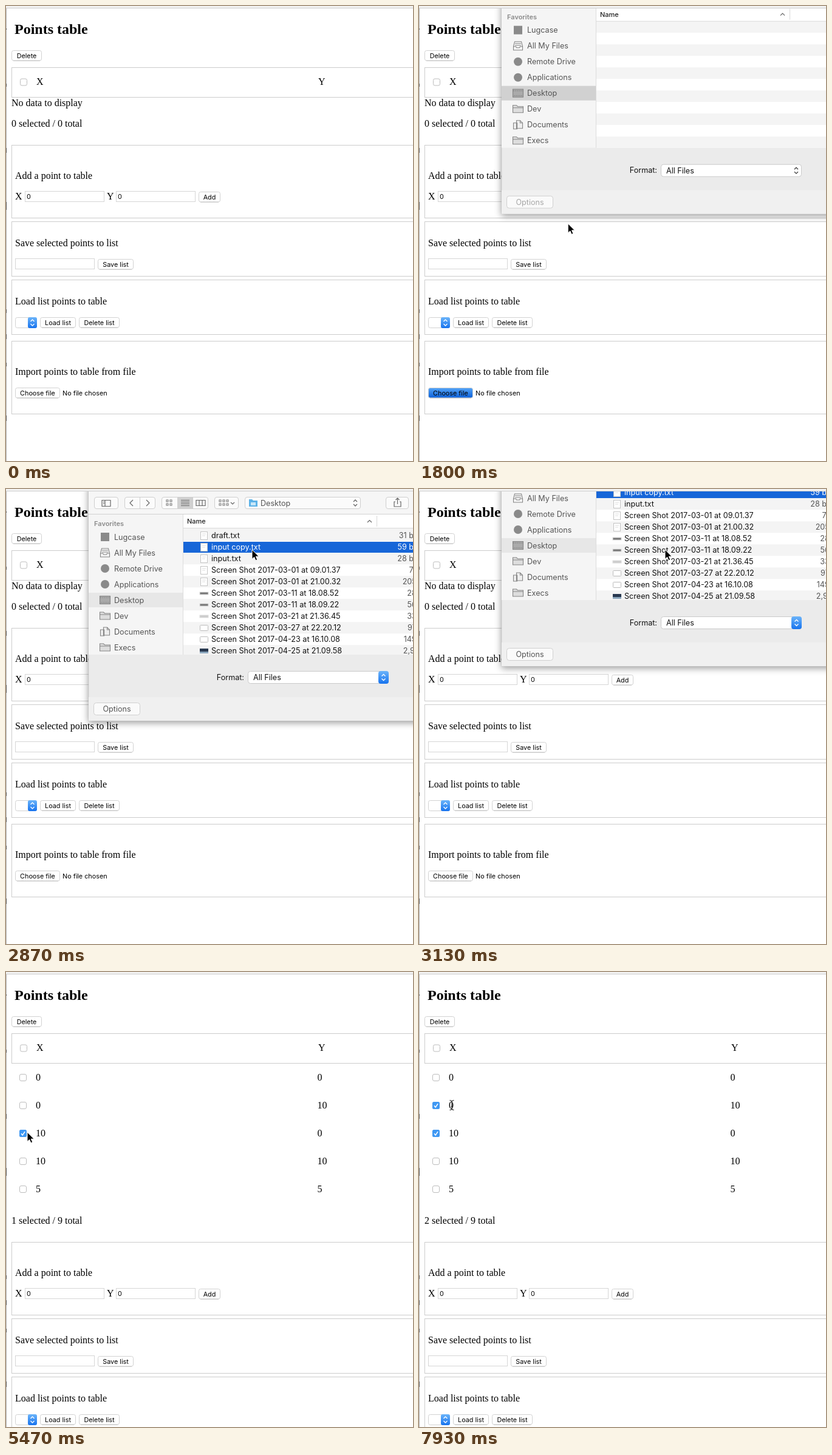
An HTML page for the animation above (8000 ms loop, 670 by 750 pixels).

```html
<!DOCTYPE html>
<html lang="en">
<head>
<meta charset="utf-8">
<title>Points table</title>
<style>
  html, body { margin: 0; width: 100%; height: 100%; overflow: hidden; background: #fff; }
  svg { display: block; }
  text { font: 16px "Liberation Serif", serif; white-space: pre; }
  .title { font-size: 24px; font-weight: bold; }
  .ui { font: 10.8px Inter, sans-serif; }
  .mac { font: 12.6px Inter, sans-serif; fill: #555; }
  .small { font: 600 11px Inter, sans-serif; fill: #8a8a8a; }
  .name { font: 500 11px Inter, sans-serif; fill: #222; }
  .dark { fill: #111; }
  .mid { text-anchor: middle; }
  .end { text-anchor: end; }
  .line { fill: none; stroke: #ccc; }
  .field { fill: #fff; stroke: #d6d6d6; }
  .btn { fill: #fff; stroke: #d2d2d2; }
  .box { fill: #fff; stroke: #bdbdbd; }
  .icon { fill: none; stroke: #858585; stroke-width: 1.1; }
  .solid { fill: #8a8a8a; }
  .glyph { fill: none; stroke: #666; stroke-width: 1.2; }
  .tool { opacity: .5; }
  .active .tool { opacity: 1; }
  .place { fill: #d1d1d1; }
  .active .place { fill: #e7e7e7; }
  .on { visibility: hidden; }
  .active .on, .checked .on { visibility: visible; }
  .active .off { visibility: hidden; }
  .sheet-back { filter: drop-shadow(0 3px 6px rgba(0, 0, 0, .4)); }
</style>
</head>
<body>
<svg id="stage" width="670" height="750" viewBox="0 0 670 750"></svg>
<script>
const LOOP = 8000;
const SHEET_TRAVEL = 390;
const ROW_SHIFT = 216;

const text = (x, y, s, cls = '', id = '') => `<text x="${x}" y="${y}" class="${cls}" id="${id}">${s}</text>`;
const rect = (x, y, w, h, attrs = '') => `<rect x="${x}" y="${y}" width="${w}" height="${h}" ${attrs}/>`;
const path = (d, cls, attrs = '') => `<path d="${d}" class="${cls}" ${attrs}/>`;
const group = (id, inner, attrs = '') => `<g id="${id}" ${attrs}>${inner}</g>`;

const panel = (y, h) => rect(9.5, y + .5, 700, h, 'class="line"');
const field = (x, y, value = '') =>
  rect(x + .5, y + .5, 130, 17, 'class="field"') + text(x + 3, y + 13, value, 'ui');
const button = (x, y, w, label, id = '') =>
  rect(x + .5, y + .5, w - 1, 16.5, `rx="3" class="btn" id="${id}"`) +
  path(`M${x + 3} ${y + 17.2}h${w - 6}`, '', 'stroke="#bcbcbc" stroke-width=".8"') +
  text(x + w / 2, y + 13, label, 'ui mid');
const chevrons = (x, y, color) =>
  path(`M${x - 3} ${y - 2}l3 -3 3 3M${x - 3} ${y + 2}l3 3 3 -3`, '', `fill="none" stroke="${color}" stroke-width="1.3"`);
const checkbox = (x, y, id = '') => group(id,
  rect(x + .5, y + .5, 11, 11, 'rx="2.5" class="box"') +
  `<g class="on">${rect(x, y, 12, 12, 'rx="2.5" fill="#3f98f3"')}` +
  path(`M${x + 3} ${y + 6.3}l2.2 2.6 3.9 -5.8`, '', 'fill="none" stroke="#fff" stroke-width="1.5"') + '</g>');

const forms = () =>
  text(9, 199, '', '', 'count') +
  panel(229, 120) + text(15, 285, 'Add a point to table') +
  text(15, 319, 'X') + field(31, 305, '0') + text(166, 319, 'Y') + field(181, 305, '0') + button(317, 306, 36, 'Add') +
  panel(355, 90) + text(15, 396, 'Save selected points to list') + field(15, 416) + button(151, 417, 59, 'Save list') +
  panel(451, 90) + text(15, 492, 'Load list points to table') +
  rect(15.5, 513.5, 35, 17, 'rx="3" class="btn"') + rect(36, 513, 15, 18, 'rx="3" fill="url(#blue)"') +
  chevrons(43.5, 522, '#fff') + button(56, 513, 59, 'Load list') + button(120, 513, 67, 'Delete list') +
  panel(552, 120) + text(15, 608, 'Import points to table from file') +
  button(15, 629, 74, 'Choose file', 'choose') + text(93, 642, 'No file chosen', 'ui');

const points = [[0, 0], [0, 10], [10, 0], [10, 10], [5, 5]];
const tableRows = () => points.map(([x, y], i) => {
  const top = 168 + 46 * i;
  return checkbox(22, top, 'check' + i) + text(49, top + 11, x) + text(512.5, top + 11, y);
}).join('');

// Sidebar glyphs are centred on (163, y).
const folder = y => path(`M154.500 ${y + 6}v-12h6l2 2h9v10zM154.500 ${y - 2}h17`, 'icon', 'style="fill:#ddd"');
const glyphs = {
  square: y => rect(156, y - 7, 14, 14, 'class="solid"'),
  circle: y => `<circle cx="163" cy="${y}" r="7" class="solid"/>`,
  tray: y => path(`M155.500 ${y + 7}v-6l2 -8h11l2 8v6zM155.500 ${y + 1}h4l1 2h5l1 -2h4M158 ${y - 4}h10M158 ${y - 1}h10`, 'icon'),
  desk: y => rect(154.5, y - 6.5, 17, 13, 'class="icon" style="fill:#aaa"') + path(`M155 ${y - 4}h16M156 ${y + 4}h14`, 'icon', 'stroke-dasharray="2 1"'),
  pages: y => path(`M155.500 ${y - 3}h6v10h-6zM160.500 ${y - 7}h6l4 4v9h-10zM166.500 ${y - 7}v4h4`, 'icon', 'style="fill:#eee"'),
  folder
};
const places = [
  ['Lugcase', 'square'], ['All My Files', 'tray'], ['Remote Drive', 'circle'], ['Applications', 'circle'],
  ['Desktop', 'desk'], ['Dev', 'folder'], ['Documents', 'pages'], ['Execs', 'folder']
];
const sidebar = () =>
  rect(136, 42, 155, 231, 'fill="#f5f5f5"') + rect(136, 171, 155, 24, 'class="place"') +
  rect(291, 42, 1, 231, 'fill="#dcdcdc"') + text(145, 61, 'Favorites', 'small') +
  places.map(([name, glyph], i) => glyphs[glyph](79 + 26 * i) + text(178, 83.5 + 26 * i, name, 'mac')).join('');

const shots = ['03-01 at 09.01.37', '03-01 at 21.00.32', '03-11 at 18.08.52', '03-11 at 18.09.22',
  '03-21 at 21.36.45', '03-27 at 22.20.12', '04-23 at 16.10.08', '04-25 at 21.09.58'];
const files = ['draft.txt', 'input copy.txt', 'input.txt', ...shots.map(s => 'Screen Shot 2017-' + s)];
const sizes = ['31 bytes', '59 bytes', '28 bytes', '71 KB', '205 KB', '28 KB', '56 KB', '33 KB', '97 KB', '149 KB', '2,9 MB'];

const thumbnail = (i, y) => {
  if (i < 5) return rect(320.5, y - 6.5, 11, 13, 'fill="#fff" stroke="#c4c4c4"') + path(`M323 ${y - 3}h6M323 ${y}h5`, '', 'stroke="#ddd"');
  if (i < 8) return rect(319, y - 2, 14, 4, `fill="${i < 7 ? '#777' : '#ccc'}" stroke="#ddd"`);
  if (i < 10) return rect(319.5, y - 4.5, 13, 9, 'rx="1" fill="#fff" stroke="#bbb"');
  return rect(319, y - 4, 14, 8, 'fill="#28384f"') + rect(319, y + 1, 14, 3, 'fill="#8ba6bd"');
};
const stripes = top => Array.from({ length: 11 }, (_, i) =>
  rect(292, top + 19 * i, 400, 19, `fill="${i % 2 ? '#fff' : '#f4f4f4'}"`)).join('');
const fileList = () => stripes(67.5) +
  rect(292, 87, 400, 18, 'fill="#1766d8" id="selection"') +
  files.map((name, i) => {
    const y = 77 + 19 * i;
    return thumbnail(i, y) + text(338, y + 4.3, name, 'mac dark', 'file' + i) +
      text(696, y + 4.3, sizes[i], 'mac end', 'size' + i);
  }).join('');

const toolBox = (x, w) => rect(x + .5, 13.5, w, 19, 'rx="3.5" fill="#fbfbfb" stroke="#cfcfcf"');
const dots = (x, y, cols, rows, step) => Array.from({ length: cols * rows }, (_, i) =>
  rect(x + i % cols * step, y + (i / cols | 0) * step, 3, 3, 'fill="none" stroke="#666" stroke-width=".9"')).join('');
const toolbar = () =>
  rect(136, 4, 560, 38, 'fill="#f6f6f6"') + rect(136, 41, 560, 1, 'fill="#d2d2d2"') +
  `<g class="tool">` + toolBox(145, 39) + toolBox(195, 50) + toolBox(256, 76) + toolBox(343, 39) + toolBox(393, 190) + toolBox(625, 37) +
  rect(282, 14, 25, 19, 'fill="#d0d0d0"') +
  path('M220.500 14v19M307.500 14v19', 'line') +
  path('M158 18.500h14v10h-14zM163 18.500v10M160 21h2M160 23.500h2M209 18l-5 5 5 5M231 18l5 5 -5 5', 'glyph') +
  dots(264, 18, 2, 2, 6) +
  path('M288 18.500h14M288 21.500h14M288 24.500h14M288 27.500h14M313 18.500h15v9h-15zM318 18.500v9M323 18.500v9', 'glyph') +
  dots(351, 18, 3, 2, 6) + path('M370 22l3 3 3 -3', 'glyph') +
  path('M400 29v-12h5l2 2h7v10z', '', 'fill="#5db3e8"') + rect(403, 22, 8, 5, 'fill="#c8e7f8"') +
  text(419, 27.5, 'Desktop', 'mac') + chevrons(575, 23, '#666') +
  path('M641 21h-2v8h11v-8h-2M644.500 25v-10M641.500 18l3 -3 3 3', 'glyph') + '</g>';

const sheet = () =>
  rect(136, -8, 560, 390, 'fill="#ebebeb" stroke="#bdbdbd" stroke-width=".6" class="sheet-back"') +
  rect(136, 343, 560, 39, 'fill="#f0f0f0"') +
  rect(292, 42, 400, 231, 'fill="#fff"') +
  `<g clip-path="url(#listClip)">${stripes(64.5)}${group('files', fileList())}</g>` +
  rect(292, 42, 400, 22, 'fill="#fff"') + path('M292 64.500h400M610.500 44v18', '', 'stroke="#d9d9d9"') +
  text(298, 57, 'Name', 'name') + path('M595 55l3.500 -3.500 3.500 3.500', 'glyph') +
  sidebar() + toolbar() +
  text(392, 314.5, 'Format:', 'mac dark end') +
  rect(398.5, 300.5, 231, 20, 'rx="4" fill="#fff" stroke="#cacaca"') + text(407, 315, 'All Files', 'mac dark') +
  `<g class="off">${chevrons(621, 310.5, '#444')}</g>` +
  `<g class="on">${rect(613, 300, 17, 21, 'rx="4" fill="url(#blue)"')}${chevrons(621.5, 310.5, '#fff')}</g>` +
  rect(144.5, 352.5, 76, 20, 'rx="4" fill="#fafafa" stroke="#d0d0d0"') +
  `<g class="tool">${text(182.5, 367, 'Options', 'mac mid')}</g>`;

const gradient = (id, from, to) =>
  `<linearGradient id="${id}" x2="0" y2="1"><stop stop-color="${from}"/><stop offset="1" stop-color="${to}"/></linearGradient>`;

const $ = id => document.getElementById(id);
$('stage').innerHTML =
  '<defs>' + gradient('blue', '#6bb4fa', '#1773ee') + gradient('pressed', '#55a5f8', '#0b5fd8') +
  `<clipPath id="listClip">${rect(292, 64, 400, 209)}</clipPath><clipPath id="windowClip">${rect(0, 4, 670, 746)}</clipPath></defs>` +
  rect(0, 0, 670, 750, 'fill="#fff"') + rect(0, 0, 670, 3, 'fill="#f3f3f3"') + rect(0, 3, 670, 1, 'fill="#cfcfcf"') +
  rect(0, 4, 1, 746, 'fill="#b4b4b4"') +
  path('M.5 37v2M.5 128v5M.5 234v8M.5 323v13M.5 500v6M.5 541v8M.5 588v6M.5 675v9', '', 'stroke="#555"') +
  text(14, 46, 'Points table', 'title') + button(9, 73, 50, 'Delete') +
  panel(101, 49) + checkbox(23, 119.5) + text(50, 130, 'X') + text(514, 130, 'Y') +
  text(9, 165, 'No data to display', '', 'empty') +
  group('rows', tableRows()) + group('forms', forms()) +
  `<g clip-path="url(#windowClip)">${group('sheet', sheet())}</g>` +
  group('cursor',
    path('M0 0V15.500L3.600 12.200L6 17.700L8.700 16.500L6.300 11.200H11.200Z', '', 'id="arrow" fill="#000" stroke="#fff"') +
    path('M-3.500 -8Q0 -8 0 -5Q0 -8 3.500 -8M0 -5V5M-3.500 8Q0 8 0 5Q0 8 3.500 8M-1.500 2H1.500', '', 'id="beam" fill="none" stroke="#222" stroke-width="1.2"'));

// Pointer stops: time, x, y.
const stops = [
  [130, 300, 754], [330, 158, 722], [470, 158, 722], [1130, 77, 638], [1530, 77, 638],
  [2000, 351, 183], [2200, 351, 183], [2700, 405, 100], [3300, 405, 100], [3670, 148, 288],
  [3900, 148, 288], [4270, 33, 174], [4530, 40, 246], [4870, 35, 264], [5500, 35, 264],
  [5850, 33, 202], [6130, 34, 219], [6400, 34, 219], [7050, 40, 82], [7280, 40, 82], [7800, 54, 219.500]
];
const ease = (t, from, to) => {
  const p = Math.min(1, Math.max(0, (t - from) / (to - from)));
  return p * p * (3 - 2 * p);
};
const pointerAt = t => {
  const next = stops.findIndex(s => s[0] > t);
  if (next === 0) return [300, 800];
  if (next < 0) return stops[stops.length - 1].slice(1);
  const [t0, x0, y0] = stops[next - 1], [t1, x1, y1] = stops[next];
  const p = ease(t, t0, t1);
  return [x0 + (x1 - x0) * p, y0 + (y1 - y0) * p];
};
const show = (id, on) => { $(id).style.display = on ? '' : 'none'; };

function draw(t) {
  const loaded = t >= 3400;
  const firstChecked = t >= 4950, secondChecked = t >= 6200;
  const selected = t >= 2870;

  show('empty', !loaded);
  show('rows', loaded);
  $('forms').setAttribute('transform', `translate(0 ${loaded ? ROW_SHIFT : 0})`);
  $('count').textContent = `${firstChecked + secondChecked} selected / ${loaded ? 9 : 0} total`;
  $('check2').setAttribute('class', firstChecked ? 'checked' : '');
  $('check1').setAttribute('class', secondChecked ? 'checked' : '');
  $('choose').style.fill = t >= 1330 && t < 2130 ? 'url(#pressed)' : '';

  const open = ease(t, 1560, 1860) - ease(t, 3050, 3310);
  show('sheet', open > 0);
  $('sheet').setAttribute('transform', `translate(0 ${(open - 1) * SHEET_TRAVEL})`);
  $('sheet').setAttribute('class', t >= 2200 ? 'active' : '');
  show('files', t >= 2130);
  show('selection', selected);
  $('file1').style.fill = $('size1').style.fill = selected ? '#fff' : '';

  const [x, y] = pointerAt(t);
  $('cursor').setAttribute('transform', `translate(${x} ${y})`);
  show('arrow', t < 7740);
  show('beam', t >= 7740);
}

const start = performance.now();
(function tick() {
  draw((performance.now() - start) % LOOP);
  requestAnimationFrame(tick);
})();
</script>
</body>
</html>
```
